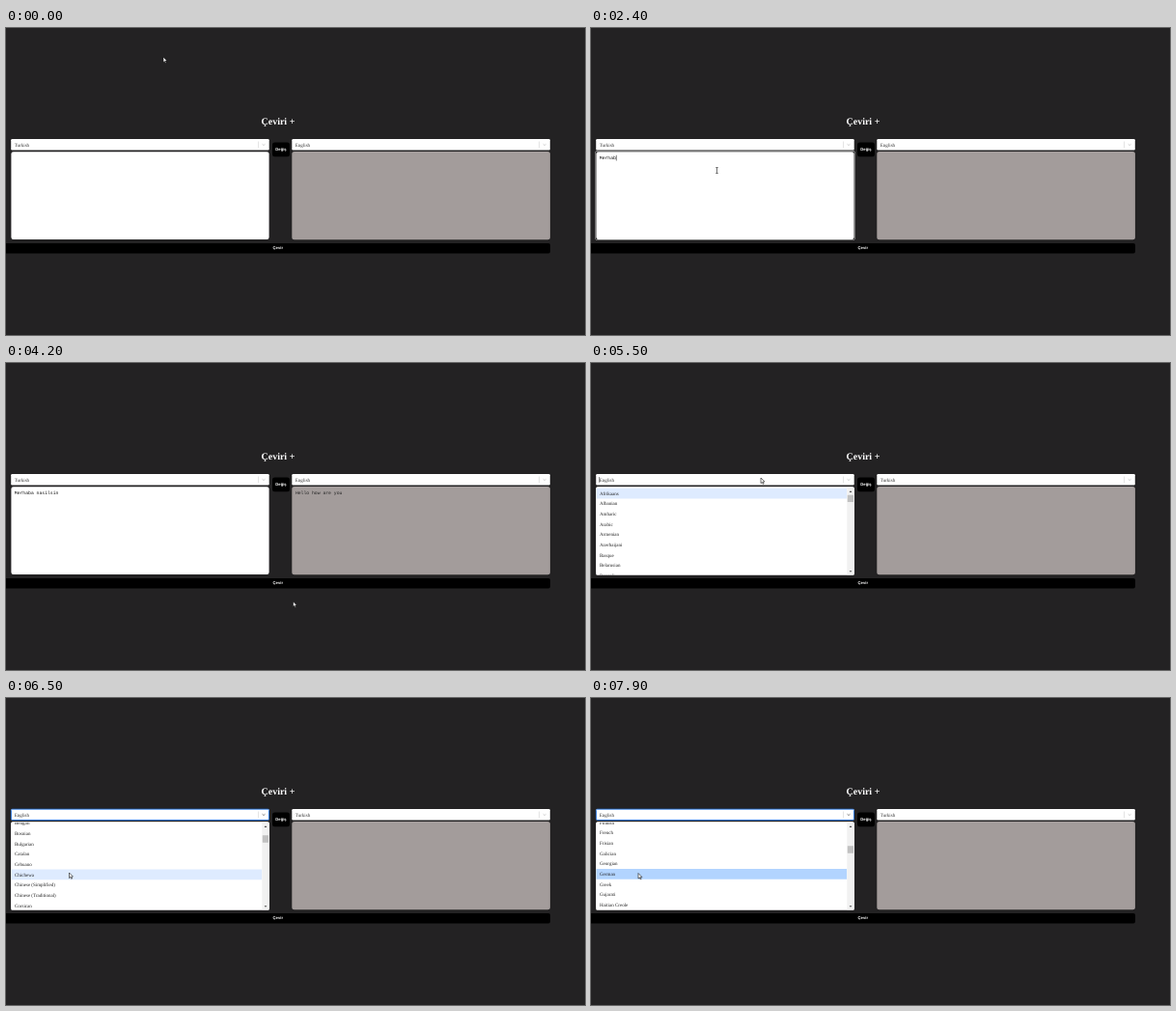
An HTML page with a canvas that plays this animation: 600 by 318 pixels, repeating every 8000 ms.

```html
<!DOCTYPE html>
<html lang="tr">
<head>
<meta charset="utf-8">
<title>Çeviri +</title>
<style>
html, body { margin: 0; height: 100%; overflow: hidden; background: #232223; }
canvas { display: block; }
</style>
</head>
<body>
<canvas width="600" height="318"></canvas>
<script>
const ctx = document.querySelector('canvas').getContext('2d');
const LOOP = 8000, STEP = 100, ROW = 10.68, LIST_TOP = 129.7;
const SERIF = '"Liberation Serif", serif', SANS = '"Liberation Sans", sans-serif', MONO = '"Liberation Mono", monospace';

const languages = ('Afrikaans,Albanian,Amharic,Arabic,Armenian,Azerbaijani,Basque,Belarusian,Bengali,Bosnian,Bulgarian,' +
  'Catalan,Cebuano,Chichewa,Chinese (Simplified),Chinese (Traditional),Corsican,Croatian,Czech,Danish,Dutch,English,' +
  'Esperanto,Estonian,Filipino,Finnish,French,Frisian,Galician,Georgian,German,Greek,Gujarati,Haitian Creole,Hausa').split(',');

// [time, x, y]
const pointerPath = [
  [0, 163, 30], [200, 207, 38], [400, 207, 38], [500, 212.5, 62], [700, 212.5, 62], [800, 228, 44],
  [1200, 130.5, 147.5], [3600, 130.5, 147.5], [4000, 270, 227], [4200, 297.5, 247], [4300, 297.5, 247],
  [4500, 286, 124], [4700, 286, 124], [5000, 255, 97], [5400, 176, 119], [5700, 176, 119],
  [6100, 84, 172], [6400, 65.5, 181], [6600, 65.5, 181], [7100, 51.5, 186], [7400, 51.5, 186], [7700, 49, 181.5], [8000, 49, 181.5]
];
// [time, offset]
const scrollPath = [[5900, 0], [6400, 91], [6600, 91], [7200, 175], [7300, 182], [7400, 182], [7800, 273]];
const keyTimes = [1800, 1800, 2100, 2300, 2400, 2400, 2500, 2600, 2800, 2900, 3000, 3100, 3200, 3300, 3400, 3400];

function valueAt(path, t, i = 1) {
  const next = path.findIndex(key => key[0] > t);
  if (next === 0) return path[0][i];
  if (next < 0) return path[path.length - 1][i];
  const a = path[next - 1], b = path[next];
  return a[i] + (b[i] - a[i]) * (t - a[0]) / (b[0] - a[0]);
}

function box(x, y, w, h, radius, fill) {
  ctx.beginPath();
  ctx.roundRect(x, y, w, h, radius);
  ctx.fillStyle = fill;
  ctx.fill();
}

function outline(x, y, w, h, radius, color, width) {
  ctx.beginPath();
  ctx.roundRect(x, y, w, h, radius);
  ctx.strokeStyle = color;
  ctx.lineWidth = width;
  ctx.stroke();
}

function polyline(points, color, width) {
  ctx.beginPath();
  points.forEach(([x, y]) => ctx.lineTo(x, y));
  ctx.strokeStyle = color;
  ctx.lineWidth = width;
  ctx.stroke();
}

function text(str, x, y, font, color, align = 'left') {
  ctx.font = font;
  ctx.fillStyle = color;
  ctx.textAlign = align;
  ctx.fillText(str, x, y);
}

function select(x, label, open) {
  box(x, 115, 267.5, 11.6, 1.25, '#fff');
  if (open) outline(x + .2, 115.2, 267.1, 11.2, 1.25, '#2070de', .9);
  text(label, x + 3.5, 122.5, `5px ${SERIF}`, '#333');
  box(x + 256, 117.4, .4, 6.8, 0, '#bbb');
  polyline([[x + 260.3, 120.2], [x + 261.8, 121.6], [x + 263.3, 120.2]], open ? '#555' : '#bbb', .7);
}

function triangle(x, y, dir) {
  ctx.beginPath();
  ctx.moveTo(x - 1.4, y);
  ctx.lineTo(x + 1.4, y);
  ctx.lineTo(x, y + dir * 1.6);
  ctx.fillStyle = '#444';
  ctx.fill();
}

function menu(t) {
  const scroll = valueAt(scrollPath, t), before = t - STEP;
  const focused = Math.max(0, Math.floor((valueAt(pointerPath, before, 2) - LIST_TOP + valueAt(scrollPath, before)) / ROW));
  box(5.2, 128.4, 267.6, 91.4, 1.25, '#fff');
  ctx.save();
  ctx.beginPath();
  ctx.rect(5.2, 128.8, 267.6, 90.6);
  ctx.clip();
  languages.forEach((name, i) => {
    const y = LIST_TOP + i * ROW - scroll, selected = name === 'English';
    if (selected) box(5.2, y, 260, ROW, 0, '#2684ff');
    else if (i === focused) box(5.2, y, 260, ROW, 0, t >= 7900 ? '#b2d4ff' : '#deebff');
    text(name, 9, y + 7, `5px ${SERIF}`, selected ? '#fff' : '#222');
  });
  box(265.3, 128.8, 7.2, 90.6, 0, '#f1f1f1');
  box(265.8, 136.7 + scroll * .061, 6.2, 7.4, 0, '#c1c1c1');
  triangle(269, 133.9, -1);
  triangle(269, 215.2, 1);
  ctx.restore();
}

function pointer(t) {
  const x = valueAt(pointerPath, t), y = valueAt(pointerPath, t, 2);
  if (t >= 1200 && t < 3900) {
    polyline([[x - 1.3, y - 3], [x + 1.3, y - 3]], '#333', .6);
    polyline([[x, y - 3], [x, y + 3]], '#333', .7);
    polyline([[x - 1.3, y + 3], [x + 1.3, y + 3]], '#333', .6);
    return;
  }
  const shape = [[0, 0], [0, 5.6], [1.3, 4.4], [2.2, 6.3], [3.1, 5.9], [2.2, 4.1], [3.9, 4]];
  ctx.beginPath();
  shape.forEach(([dx, dy]) => ctx.lineTo(x + dx, y + dy));
  ctx.closePath();
  ctx.fillStyle = '#fff';
  ctx.strokeStyle = '#111';
  ctx.lineWidth = .6;
  ctx.fill();
  ctx.stroke();
}

function draw(t) {
  const swapped = t >= 4700, open = t >= 5500, typing = t >= 1300 && t < 4000;
  const mono = `4.75px ${MONO}`, label = `bold 4.17px ${SANS}`;
  ctx.textRendering = 'geometricPrecision';
  box(0, 0, 600, 318, 0, '#232223');
  text('Çeviri +', 281.9, 100.3, `bold 10px ${SERIF}`, '#fff', 'center');

  select(5.2, swapped ? 'English' : 'Turkish', t >= 5600);
  select(296.3, swapped ? 'Turkish' : 'English', false);
  box(276, 118.4, 18, 14.8, 2.5, '#000');
  text('Değiş', 285, 127.2, label, '#fff', 'center');

  if (typing) box(4.2, 127, 269.6, 93, 3, '#ddd');
  if (typing) box(4.6, 127.4, 268.8, 92.2, 2.7, '#101010');
  box(5.4, 128.2, 267.2, 90.8, 2.2, '#fff');
  box(296.3, 128, 267.6, 91.2, 2.5, '#a39c9b');
  box(-2, 223, 566, 10.4, 2, t >= 4000 && t < 4200 ? '#181818' : '#000');
  text('Çevir', 281.8, 229.3, label, '#fff', 'center');

  if (!swapped) {
    const typed = keyTimes.filter(key => key <= t).length;
    text('Merhaba nasilsin'.slice(0, typed), 8.8, 136.2, mono, '#111');
    if (typing && (t < 1600 || typed)) box(8.8 + typed * 2.85, 131.8, .5, 5.6, 0, '#000');
    if (t >= 4100) text('Hello how are you', 299.9, 136.2, mono, '#222');
  }
  if (open) {
    menu(t);
    if ((t - 5500) % 1400 < 700) box(8.3, 117.9, .5, 5.9, 0, '#222');
  }
  pointer(t);
}

function tick(now) {
  draw(Math.floor(now % LOOP / STEP) * STEP);
  requestAnimationFrame(tick);
}
requestAnimationFrame(tick);
</script>
</body>
</html>
```
